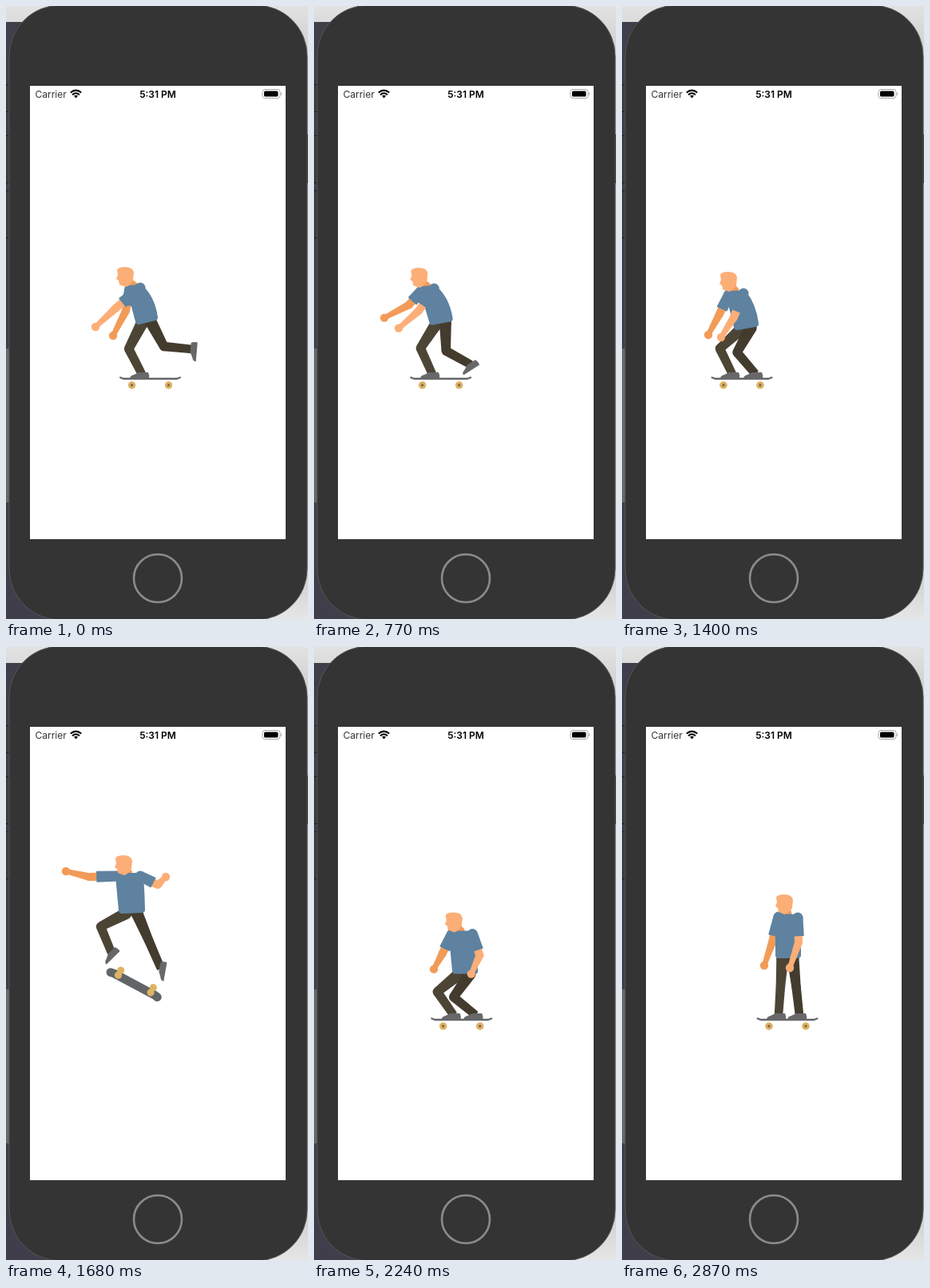
Animation, 378 px wide and 768 px high, one loop 2940 ms. Source, as an HTML page with a canvas:

```html
<!DOCTYPE html>
<html lang="en">
<head>
<meta charset="utf-8">
<title>Skater</title>
<style>
  html, body { margin: 0; width: 100%; height: 100%; overflow: hidden; background: #d6d6d6; }
  svg, canvas { position: absolute; left: 0; top: 0; width: 378px; height: 768px; }
  text { font: 12px Inter, Roboto, sans-serif; }
</style>
</head>
<body>
<svg viewBox="0 0 378 768">
  <defs>
    <linearGradient id="wall" x2="0" y2="1">
      <stop offset="0" stop-color="#e2e2e2"/><stop offset=".12" stop-color="#c2c2c2"/>
      <stop offset=".9" stop-color="#c6c6c6"/><stop offset="1" stop-color="#e6e6e6"/>
    </linearGradient>
  </defs>
  <rect width="378" height="768" fill="url(#wall)"/>
  <rect y="20" width="100" height="748" fill="#403e4a"/>
  <rect y="429" width="20" height="193" fill="#686868"/>
  <g fill="#3d3d3d" stroke="#1c1c1c">
    <rect x="-3" y="98.500" width="9" height="34"/>
    <rect x="-3" y="162.500" width="9" height="59"/>
    <rect x="-3" y="231.500" width="9" height="59"/>
    <rect x="374.500" y="161.500" width="6" height="60"/>
  </g>
  <rect x="4" y="-1" width="373" height="770" rx="64" fill="#343434" stroke="#555"/>
  <rect x="30" y="100" width="320" height="568" fill="#fff"/>
  <circle cx="190" cy="717" r="30" fill="none" stroke="#8b8b8b" stroke-width="2.600"/>
  <text x="36.500" y="115" fill="#333">Carrier</text>
  <text x="190" y="115" text-anchor="middle" font-weight="600" style="font-weight:600">5:31 PM</text>
  <g fill="none" stroke="#000" stroke-width="2">
    <path d="M80.800 108.600Q87.500 102.600 94.200 108.600M83 111.300Q87.500 107.300 92 111.300"/>
    <path d="M85 112.600Q87.500 110.700 90 112.600L87.500 115.600Z" fill="#000" stroke="none"/>
  </g>
  <rect x="321" y="104.500" width="22" height="11" rx="3" fill="none" stroke="#aaa"/>
  <rect x="323" y="106.500" width="17.500" height="7" rx="1.500"/>
  <path d="M344.500 108.500v3" stroke="#aaa"/>
</svg>
<canvas id="stage"></canvas>
<script>
const LOOP = 2940, STEP = 70;
const SHIRT = '#5e82a0', SHOE = '#68686a', DECK = '#616567', WHEEL = '#deb365';
const SKIN = '#fcae77', SKIN_SHADE = '#f29b58', PANTS = '#4c4535', PANTS_SHADE = '#433c2e';

const canvas = document.getElementById('stage');
const ctx = canvas.getContext('2d');
const ratio = window.devicePixelRatio || 1;
canvas.width = 378 * ratio;
canvas.height = 768 * ratio;

// shoulders and waist: [far x, y, near x, y]; arms: [elbow, hand];
// feet: [x, y, angle]; board: [x, y, angle, roll]
const poses = [];
const pose = (time, parts) => poses.push({ ...(poses.at(-1) || {}), ...parts, time });

pose(0, { head: [149, 339], shoulders: [155, 354, 168, 353], waist: [166, 395, 186, 390],
  farArm: [150, 382, 134, 413], nearArm: [138, 378, 112, 402],
  lead: [170, 461, 0], trail: [233, 430, -85], board: [180.5, 467, 0, 0] });
pose(315, { head: [143, 345], shoulders: [148, 360, 162, 359], waist: [161, 400, 182, 396],
  farArm: [142, 388, 115, 408], nearArm: [141, 387, 111, 403],
  lead: [162, 461, 0], trail: [172, 469, 0], board: [171, 467, 0, 0] });
pose(490, { head: [141, 349], shoulders: [145, 364, 158, 363], waist: [160, 401, 180, 398],
  farArm: [138, 391, 104, 405], nearArm: [143, 391, 110, 403],
  lead: [157, 461, 0], trail: [204, 470, -15], board: [166, 467, 0, 0] });
pose(630, { head: [134, 342], shoulders: [140, 357, 153, 356], waist: [153, 397, 173, 393],
  farArm: [124, 378, 92, 394], nearArm: [133, 384, 106, 405],
  lead: [152, 461, 0], trail: [217, 440, -70], board: [162, 467, 0, 0] });
pose(840, { head: [130, 339], shoulders: [134, 354, 149, 353], waist: [146, 395, 168, 391],
  farArm: [116, 373, 86, 389], nearArm: [130, 381, 106, 403],
  lead: [146, 461, 0], trail: [186, 454, -15], board: [157, 467, 0, 0] });
pose(1120, { head: [127, 337], shoulders: [129, 352, 146, 351], waist: [138, 393, 161, 389],
  farArm: [120, 379, 97, 402], nearArm: [133, 382, 113, 407],
  lead: [138, 461, 0], trail: [167, 461, 0], board: [149.5, 467, 0, 0] });
pose(1400, { head: [133, 345], shoulders: [134, 361, 152, 360], waist: [144, 402, 167, 398],
  farArm: [122, 386, 108, 412], nearArm: [140, 390, 124, 415],
  board: [150, 467, 0, 0] });
pose(1680, { head: [147, 273], shoulders: [141, 287, 168, 287], waist: [145, 330, 170, 329],
  farArm: [104, 288, 75, 281], nearArm: [190, 298, 200, 288],
  lead: [132, 383, -45], trail: [194, 403, -80], board: [160.5, 422.5, 28, 120] });
pose(1820, { head: [156, 271], shoulders: [149, 285, 176, 285], waist: [152, 330, 177, 330],
  farArm: [113, 278, 87, 250], nearArm: [200, 295, 208, 285],
  lead: [139, 387, -48], trail: [194, 404, -62], board: [167, 420, 25, 195] });
pose(1960, { head: [165, 281], shoulders: [158, 292, 183, 292], waist: [160, 337, 184, 337],
  farArm: [126, 277, 104, 258], nearArm: [209, 294, 215, 285],
  lead: [148, 397, -50], trail: [196, 413, -45], board: [173, 427, 24, 270] });
pose(2170, { head: [172, 347], shoulders: [170, 362, 196, 362], waist: [175, 408, 199, 408],
  farArm: [158, 385, 146, 402], nearArm: [206, 388, 196, 410],
  lead: [172, 461, 0], trail: [200, 461, 0], board: [182, 467, 0, 360] });
pose(2520, { head: [186, 335], shoulders: [183, 350, 208, 350], waist: [185, 396, 210, 396],
  farArm: [171, 382, 166, 410], nearArm: [213, 380, 200, 408],
  lead: [185, 461, 0], trail: [211, 461, 0], board: [195.5, 467, 0, 360] });
pose(2800, { head: [203, 322], shoulders: [196, 338, 220, 339], waist: [196, 386, 220, 386],
  farArm: [188, 370, 178, 399], nearArm: [221, 370, 210, 402],
  lead: [196, 461, 0], trail: [222, 461, 0], board: [207, 467, 0, 360] });

const mix = (a, b, k) => a.map((v, i) => v + (b[i] - v) * k);
const rad = degrees => degrees * Math.PI / 180;

function poseAt(time) {
  const next = poses.findIndex(p => p.time > time);
  if (next < 0) return poses.at(-1);
  const a = poses[next - 1], b = poses[next];
  const k = (time - a.time) / (b.time - a.time);
  const result = {};
  for (const part in a) if (part !== 'time') result[part] = mix(a[part], b[part], k);
  return result;
}

function disc([x, y], r, color) {
  ctx.fillStyle = color;
  ctx.beginPath();
  ctx.arc(x, y, r, 0, 7);
  ctx.fill();
}

function shape(d, color) {
  ctx.fillStyle = color;
  ctx.fill(new Path2D(d));
}

function placed([x, y], angle, draw) {
  ctx.save();
  ctx.translate(x, y);
  ctx.rotate(rad(angle));
  draw();
  ctx.restore();
}

// Tapered bar between two points
function bar(a, b, widthA, widthB, color) {
  const length = Math.hypot(b[0] - a[0], b[1] - a[1]);
  placed(a, Math.atan2(b[1] - a[1], b[0] - a[0]) * 180 / Math.PI, () =>
    shape(`M0 ${-widthA / 2}L${length} ${-widthB / 2}V${widthB / 2}L0 ${widthA / 2}Z`, color));
}

// Knee that always bends towards the left of the hip-ankle line
function kneeBetween(hip, ankle) {
  const dx = ankle[0] - hip[0], dy = ankle[1] - hip[1];
  const length = Math.hypot(dx, dy);
  const bend = Math.sqrt(Math.max(0, 35.5 ** 2 - length ** 2 / 4));
  return [(hip[0] + ankle[0]) / 2 - dy / length * bend, (hip[1] + ankle[1]) / 2 + dx / length * bend];
}

function drawLeg(hip, foot, color) {
  const knee = kneeBetween(hip, foot);
  disc(hip, 7.5, color);
  bar(hip, knee, 15, 11.5, color);
  disc(knee, 5.7, color);
  bar(knee, foot, 11.5, 10.5, color);
  placed(foot, foot[2], () => shape('M-4-2L8-2Q10 2 9 6H-15Q-15 2-10 1Z', SHOE));
}

function drawArm(shoulder, arm, color) {
  const elbow = arm.slice(0, 2), hand = arm.slice(2);
  bar(shoulder, elbow, 11, 10, color);
  disc(elbow, 5, color);
  bar(elbow, hand, 10, 6, color);
  disc(hand, 5.2, color);
  disc(shoulder, 6.5, SHIRT);
  bar(shoulder, mix(shoulder, elbow, .75), 13, 14, SHIRT);
}

function drawTorso(shoulders, waist) {
  const [fx, fy, nx, ny] = shoulders, [wx, wy, vx, vy] = waist;
  const bulge = Math.max(0, vx - nx) * .3;
  const path = new Path2D(
    `M${fx} ${fy}L${nx} ${ny}Q${(nx + vx) / 2 + bulge} ${(ny + vy) / 2 - bulge} ${vx} ${vy}L${wx} ${wy}Z`);
  ctx.fillStyle = ctx.strokeStyle = SHIRT;
  ctx.lineWidth = 8;
  ctx.lineJoin = 'round';
  ctx.fill(path);
  ctx.stroke(path);
}

function drawHead(head, shoulders) {
  const collar = [(shoulders[0] + shoulders[2]) / 2, (shoulders[1] + shoulders[3]) / 2 - 2];
  bar([head[0] + 2, head[1] + 5], collar, 11, 10, SKIN_SHADE);
  placed(head, 0, () =>
    shape('M-10-8Q-9-12 0-12Q10-12 11-5L10 5Q7 11 1 12L-7 10L-8 5L-11 3L-9-2Z', SKIN));
}

function drawBoard([x, y, angle, roll]) {
  const c = Math.cos(rad(roll)), s = Math.sin(rad(roll));
  const drawWheels = () => {
    for (const side of [-1, 1]) for (const wx of [-23, 23]) {
      const at = [wx, 8 * c + side * 4 * s];
      disc(at, 4.6, WHEEL);
      if (Math.abs(s) < .3) disc(at, 1.7, '#7d6a48');
    }
  };
  const drawDeck = () => {
    const thickness = 2.4 + 9.5 * Math.abs(s);
    const end = 38.5 - thickness / 2;
    ctx.strokeStyle = DECK;
    ctx.lineWidth = thickness;
    ctx.lineCap = ctx.lineJoin = 'round';
    ctx.stroke(new Path2D(`M${-end} ${-1.5 * c}L${4 - end} 0H${end - 4}L${end} ${-1.5 * c}`));
  };
  placed([x, y], angle, () => {
    const layers = s > 0.05 ? [drawDeck, drawWheels] : [drawWheels, drawDeck];
    layers.forEach(draw => draw());
  });
}

function drawSkater(p) {
  const [farShoulder, nearShoulder] = [p.shoulders.slice(0, 2), p.shoulders.slice(2)];
  const waistFar = p.waist.slice(0, 2), waistNear = p.waist.slice(2);
  const hip = k => mix([waistFar[0], waistFar[1] + 4], [waistNear[0], waistNear[1] + 4], k);
  drawBoard(p.board);
  drawArm(farShoulder, p.farArm, SKIN_SHADE);
  drawLeg(hip(.2), p.lead, PANTS);
  drawLeg(hip(.75), p.trail, PANTS_SHADE);
  drawHead(p.head, p.shoulders);
  drawTorso(p.shoulders, p.waist);
  drawArm(nearShoulder, p.nearArm, SKIN);
  placed(p.head, 0, () => shape('M-7 4L9 4Q7 11 1 13L-7 10Z', SKIN));
}

function frame() {
  const time = Math.floor(performance.now() % LOOP / STEP) * STEP;
  ctx.setTransform(ratio, 0, 0, ratio, 0, 0);
  ctx.clearRect(0, 0, 378, 768);
  drawSkater(poseAt(time));
  requestAnimationFrame(frame);
}
frame();
</script>
</body>
</html>
```
